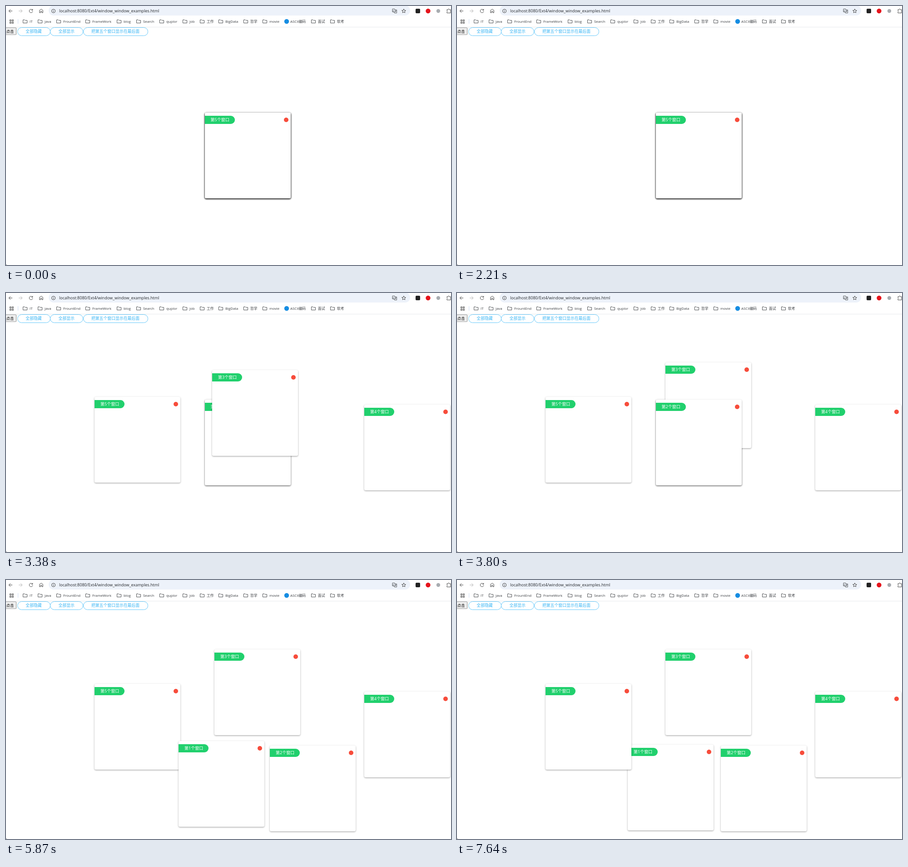
These frames come from a looping animation (980x571 px, 8000 ms). An HTML page with a canvas:

```html
<!DOCTYPE html>
<html lang="zh">
<head>
<meta charset="utf-8">
<title>Windows</title>
<style>
html, body { margin: 0; width: 100%; height: 100%; overflow: hidden; background: #fff; }
body { position: relative; font-family: "Open Sans", "Noto Sans CJK SC", "Noto Sans CJK", sans-serif; }
canvas { position: absolute; left: 0; top: 0; }
.label { position: absolute; line-height: 14px; white-space: nowrap; font-size: 7.8px; color: #3c3f43; }
.url { font-size: 9px; color: #25282c; }
.plain { font-size: 8.4px; color: #000; }
.pill {
  position: absolute; top: 47px; height: 19px; box-sizing: border-box;
  border: 1px solid #68c9fa; border-radius: 10px; background: #fff;
  color: #35b4f4; font-size: 8.85px; line-height: 17px; text-align: center; white-space: nowrap;
}
.pill.on { background: #2db7f8; border-color: #2db7f8; color: #fff; }
.win {
  position: absolute; left: 0; top: 0; width: 189px; height: 189px;
  border-radius: 3px; background: #fff; box-shadow: 0 1.2px 3.2px rgba(0, 0, 0, .36);
}
.win b {
  position: absolute; left: 0; top: 7px; width: 66px; height: 18px; box-sizing: border-box;
  padding-left: 13px; border-radius: 0 9px 9px 0; background: #21d06d;
  color: #fff; font-weight: 400; font-size: 9px; line-height: 18px; white-space: nowrap;
}
.win i {
  position: absolute; left: 174px; top: 11px; width: 10px; height: 10px;
  border-radius: 50%; background: #f74c3b;
}
</style>
</head>
<body>
<canvas id="chrome" width="980" height="571"></canvas>
<script>
const LOOP = 8000;
const HOME = [437.5, 235];
const FOLDERS = [
  [37, 'IT'], [70, 'java'], [111, 'FrountEnd'], [175, 'FrameWork'], [244, 'blog'],
  [287, 'Search'], [338, 'quplor'], [389, 'job'], [427, '工作'], [468, 'BigData'],
  [523, '哲学'], [565, 'movie'], [672, '面试'], [714, '软考']
];
const PILLS = [[24.5, 73, '全部隐藏'], [97, 72.5, '全部显示'], [169.5, 143, '把第五个窗口显示在最后面']];

// Drag paths per window: time, x, y
const DRAGS = {
  5: [[2540, 412, 235], [2570, 344, 235], [2660, 230, 230], [2690, 215, 229], [2720, 195, 229]],
  4: [[2960, 438, 235], [2990, 488, 234], [3020, 584, 234], [3050, 742, 244], [3080, 789, 245.5]],
  3: [[3230, 437, 232], [3260, 437, 223], [3320, 448, 191], [3380, 454, 170], [3470, 459, 153]],
  2: [[4760, 441, 247], [4790, 460, 280], [4850, 529, 330], [4880, 581, 364.5]],
  1: [[5780, 436, 253], [5810, 415, 291], [5840, 397, 330], [5870, 380, 355], [5900, 376, 363]]
};
// Stacking from back to front
const ORDERS = [
  [0, '12345'], [2540, '51234'], [2960, '54123'], [3800, '54132'], [5300, '54321'], [7520, '12345']
];
const SHOWN = [[0, true], [860, false], [1940, true], [7250, false], [7520, true]];
const LIT = [[0, -1], [500, 0], [1520, 1], [2210, -1], [7040, 0], [7340, 1], [7640, -1]];

function add(cls, text, css) {
  const el = document.createElement('div');
  el.className = cls;
  el.textContent = text;
  Object.assign(el.style, css);
  document.body.append(el);
  return el;
}
const label = (x, cy, text, cls = '') => add('label ' + cls, text, { left: x + 'px', top: cy - 7 + 'px' });

const g = document.getElementById('chrome').getContext('2d');

function stroke(path, color = '#474747', width = 1) {
  g.strokeStyle = color;
  g.lineWidth = width;
  g.stroke(new Path2D(path));
}
function disc(x, y, r, color) {
  g.fillStyle = color;
  g.beginPath();
  g.arc(x, y, r, 0, 7);
  g.fill();
}
function box(x, y, w, h, r, color) {
  g.fillStyle = color;
  g.beginPath();
  g.roundRect(x, y, w, h, r);
  g.fill();
}

function drawToolbar() {
  box(94, -1, 796, 22, 11, '#edf2fa');
  stroke('M14 11H6.5M10 7.2L6.3 11L10 14.8');
  stroke('M28 11H35.5M32 7.2L35.7 11L32 14.8', '#b4b4b4');
  stroke('M58 8.6A3.8 3.8 0 1 0 58.8 11.6M58.7 6.6V9.3H56');
  stroke('M73.8 14.8V9.6L77.5 6.8L81.2 9.6V14.8H78.8V11.8H76.2V14.8Z');
  stroke('M108.5 11A4 4 0 1 1 100.5 11A4 4 0 1 1 108.5 11M104.5 10.4V13.2M104.5 8.7V9.6');
  // translate
  stroke('M851 6.5H856L858 13H851ZM857 8.5H860.5V15.5H855.5L854.5 13', '#505356', .9);
  stroke('M855 9.7H852.8A1.6 1.6 0 1 0 854.4 11.2M857.8 10.6H860M859 10L857.8 13', '#505356', .7);
  // star
  let star = '';
  for (let k = 0; k < 10; k++) {
    const a = Math.PI * (k / 5 - .5), r = k % 2 ? 2.1 : 4.6;
    star += (k ? 'L' : 'M') + (876 + r * Math.cos(a)) + ' ' + (11.2 + r * Math.sin(a));
  }
  stroke(star + 'Z');
  box(902, 6, 10, 10, 2, '#222');
  disc(929.5, 11, 5.2, '#e5141c');
  disc(952, 11, 4.2, '#a9adb1');
  stroke('M971 8H973.3A1.5 1.5 0 0 1 976.3 8H979V15.3H971V12.8A1.5 1.5 0 0 0 971 10Z');
}

function drawBookmarks() {
  for (const x of [8, 13]) {
    for (const y of [30, 35]) {
      g.strokeStyle = '#474747';
      g.lineWidth = 1;
      g.strokeRect(x + .5, y + .5, 2.7, 2.7);
    }
  }
  box(26, 29, 1, 10, 0, '#cfdcf2');
  for (const [x, name] of FOLDERS) {
    stroke(`M${x + .5} 30.5H${x + 4}L${x + 5.2} 31.7H${x + 9.5}V37.5H${x + .5}Z`, '#505356');
    label(x + 15, 34, name);
  }
  disc(618, 34, 5.2, '#168de2');
  label(626, 34, 'ASCII编码');
  box(0, 46, 980, 1, 0, '#e8eaed');
}

function drawPage() {
  box(-4, 47.5, 27, 16, 2, '#767676');
  box(-4, 48.3, 26.2, 14.4, 1.3, '#efefef');
  box(0, 570, 2, 1, 0, '#8a8a8a');
}

drawToolbar();
drawBookmarks();
drawPage();
label(117, 11, 'localhost:8080/Ext4/window_window_examples.html', 'url');
label(.6, 56, '点击', 'plain');
const pills = PILLS.map(([x, w, text]) => add('pill', text, { left: x + 'px', width: w + 'px' }));

const wins = [1, 2, 3, 4, 5].map(n => {
  const el = add('win', '', {});
  el.innerHTML = `<b>第${n}个窗口</b><i></i>`;
  return el;
});

const at = (track, t) => track.filter(k => k[0] <= t).pop()[1];

// The pointer is sampled every 30 ms
function place(path, t) {
  if (t < path[0][0]) return HOME;
  const s = path[0][0] + Math.floor((t - path[0][0]) / 30) * 30;
  const j = path.findIndex(k => k[0] > s);
  if (j < 0) return path[path.length - 1].slice(1);
  const [a, b] = [path[j - 1], path[j]];
  const f = (s - a[0]) / (b[0] - a[0]);
  return [a[1] + (b[1] - a[1]) * f, a[2] + (b[2] - a[2]) * f];
}

function render(t) {
  const lit = at(LIT, t), order = at(ORDERS, t), shown = at(SHOWN, t);
  pills.forEach((el, i) => el.classList.toggle('on', i === lit));
  wins.forEach((el, i) => {
    const [x, y] = place(DRAGS[i + 1], t);
    el.style.left = x + 'px';
    el.style.top = y + 'px';
    el.style.zIndex = 1 + order.indexOf(i + 1);
    el.style.visibility = shown ? 'visible' : 'hidden';
  });
}

const start = performance.now();
function tick() {
  render((performance.now() - start) % LOOP);
  requestAnimationFrame(tick);
}
tick();
</script>
</body>
</html>
```
